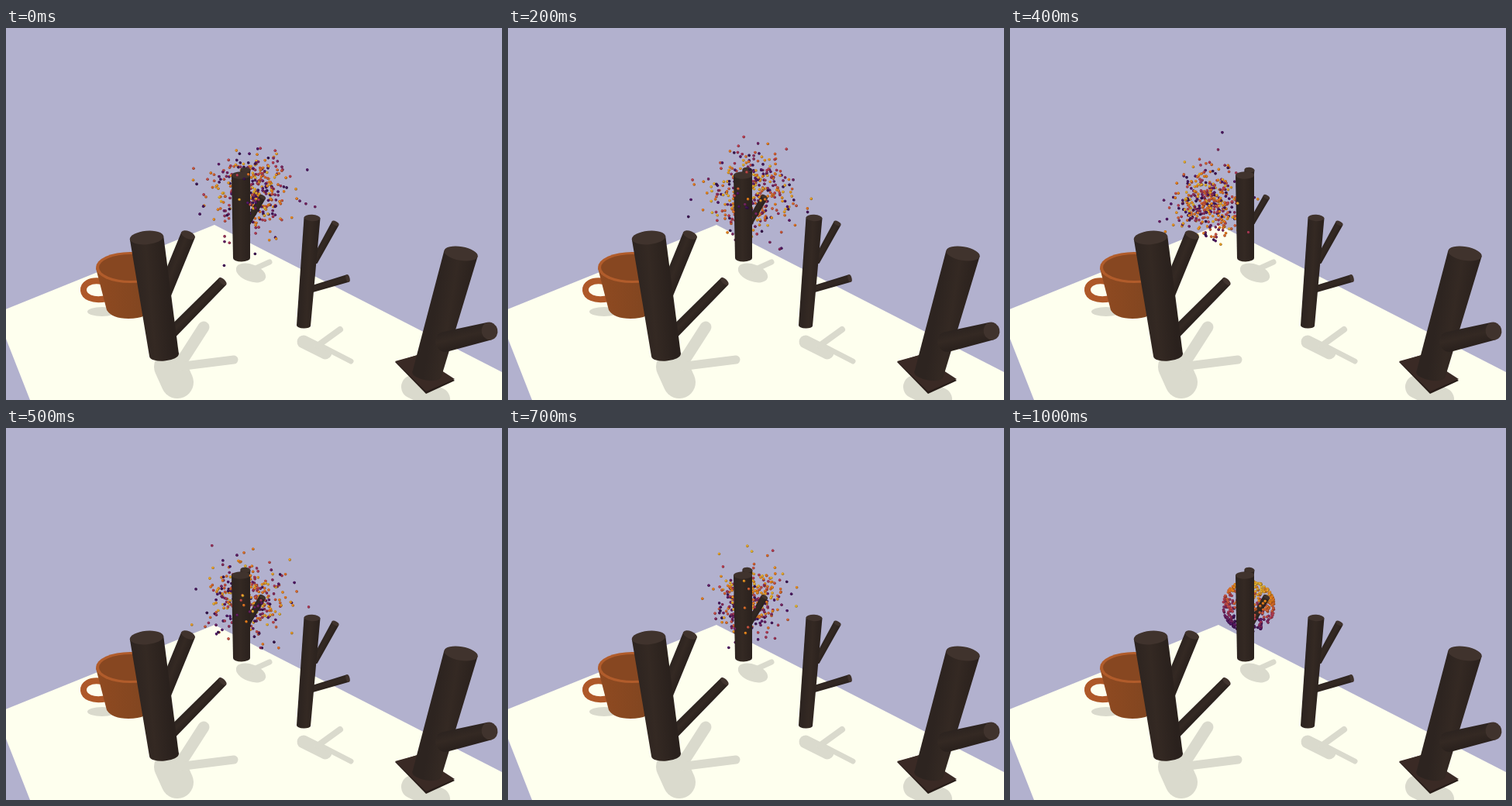
Write an HTML page with a canvas that moves like this. It is 640 by 480 pixels and loops after 2100 ms.

```html
<!DOCTYPE html>
<html lang="en">
<head>
<meta charset="utf-8">
<title>Particles settling into a sphere</title>
<style>
html, body { margin: 0; width: 100%; height: 100%; overflow: hidden; background: #b2b1ce; }
canvas { display: block; }
</style>
</head>
<body>
<canvas id="stage" width="640" height="480"></canvas>
<script>
const ctx = document.getElementById('stage').getContext('2d');
const TAU = Math.PI * 2;
const LOOP = 2100, STEP = 100, LAST_STEP = 10;
const COUNT = 400, RADIUS = 33, SPREAD = 25;
const PALETTE = [[24, 18, 48], [84, 24, 104], [184, 62, 82], [232, 128, 28], [226, 206, 62]];
const SHADOW = '#dadacd';

function random(seed) {
  return () => {
    seed = seed + 0x6d2b79f5 | 0;
    let n = Math.imul(seed ^ seed >>> 15, 1 | seed);
    n = n + Math.imul(n ^ n >>> 7, 61 | n) ^ n;
    return ((n ^ n >>> 14) >>> 0) / 4294967296;
  };
}

function rgb(color, gain = 1) {
  return `rgb(${color.map(c => Math.round(c * gain)).join()})`;
}

function paletteColor(v) {
  const p = Math.max(0, Math.min(3.999, v * 4)), i = Math.floor(p);
  return PALETTE[i].map((c, k) => c + (PALETTE[i + 1][k] - c) * (p - i));
}

// Points on the sphere, coloured by their height in the tilted view.
const nextPoint = random(7);
const points = Array.from({ length: COUNT }, () => {
  const z = nextPoint() * 2 - 1, angle = nextPoint() * TAU, r = Math.sqrt(1 - z * z);
  const x = r * Math.cos(angle), y = r * Math.sin(angle);
  const color = paletteColor(.52 + .4 * (-.88 * y + .25 * x + .4 * z));
  return { x: x * RADIUS, y: y * RADIUS, z: z * RADIUS, light: rgb(color), dark: rgb(color, .68) };
});

// Each step draws fresh noise that fades out while the sphere fades in.
function cloud(step) {
  const t = step / LAST_STEP;
  const weight = t ** 3, spread = SPREAD * (1 - t ** 4);
  const gust = Math.exp(-(((step - 3.5) / .9) ** 4));
  const lift = Math.exp(-4 * (step - 3) ** 2);
  const cx = 317 - 9 * t - 60 * gust;
  const cy = 212 + 18 * t + 8 * gust - 41 * lift;
  const next = random(100 + step * 31);
  const gauss = () => spread * Math.sqrt(-2 * Math.log(1 - next())) * Math.cos(TAU * next());
  return points.map(p => ({
    ...p,
    x: cx + p.x * weight + gauss(),
    y: cy + p.y * weight + gauss(),
    z: p.z * weight + gauss()
  })).sort((a, b) => a.z - b.z);
}
const clouds = Array.from({ length: LAST_STEP + 1 }, (_, step) => cloud(step));

function polygon(color, ...xy) {
  ctx.fillStyle = color;
  ctx.beginPath();
  for (let i = 0; i < xy.length; i += 2) ctx.lineTo(xy[i], xy[i + 1]);
  ctx.fill();
}

function ellipse(color, x, y, rx, ry, angle = 0) {
  ctx.fillStyle = color;
  ctx.beginPath();
  ctx.ellipse(x, y, rx, ry, angle, 0, TAU);
  ctx.fill();
}

function line(color, width, x1, y1, x2, y2) {
  ctx.strokeStyle = color;
  ctx.lineWidth = width;
  ctx.lineCap = 'round';
  ctx.beginPath();
  ctx.moveTo(x1, y1);
  ctx.lineTo(x2, y2);
  ctx.stroke();
}

// Tapered cylinder from its far end (x1, y1) to its base (x2, y2).
function limb(x1, y1, r1, x2, y2, r2, squash = .5, lean = 1) {
  const angle = lean * (Math.atan2(y2 - y1, x2 - x1) - Math.PI / 2);
  const c = Math.cos(angle), s = Math.sin(angle);
  const shade = ctx.createLinearGradient(x1 - c * r1, y1 - s * r1, x1 + c * r1, y1 + s * r1);
  shade.addColorStop(0, '#2d2420');
  shade.addColorStop(.45, '#342923');
  shade.addColorStop(1, '#2a211d');
  ellipse(shade, x2, y2, r2, r2 * squash, angle);
  polygon(shade, x1 - c * r1, y1 - s * r1, x1 + c * r1, y1 + s * r1,
    x2 + c * r2, y2 + s * r2, x2 - c * r2, y2 - s * r2);
  ellipse('#40332d', x1, y1, r1, r1 * squash, angle);
}

// Upright cylinders show caps that tilt less than their axis.
function trunk(x1, y1, r1, x2, y2, r2) {
  limb(x1, y1, r1, x2, y2, r2, .4, .6);
}

function shadows() {
  // back tree
  ellipse(SHADOW, 316, 316, 20, 11, .35);
  line(SHADOW, 7, 318, 312, 340, 302);
  // front tree
  line(SHADOW, 42, 212, 437, 221, 457);
  line(SHADOW, 15, 228, 428, 255, 386);
  line(SHADOW, 11, 222, 437, 294, 428);
  // middle tree
  line(SHADOW, 17, 384, 405, 412, 419);
  line(SHADOW, 8, 402, 410, 431, 389);
  line(SHADOW, 7, 410, 412, 445, 430);
  // right tree
  line(SHADOW, 30, 525, 463, 558, 479);
  // mug
  ellipse(SHADOW, 124, 366, 19, 6);
}

function mug() {
  ctx.strokeStyle = '#ae5828';
  ctx.lineWidth = 8;
  ctx.beginPath();
  ctx.moveTo(124, 327);
  ctx.bezierCurveTo(91, 321, 91, 357, 130, 349);
  ctx.stroke();
  const shade = ctx.createLinearGradient(118, 0, 185, 0);
  shade.addColorStop(0, '#8f4a21');
  shade.addColorStop(1, '#804520');
  ctx.fillStyle = shade;
  ctx.beginPath();
  ctx.moveTo(116, 310);
  ctx.lineTo(130, 364);
  ctx.quadraticCurveTo(137, 375, 158, 375);
  ctx.quadraticCurveTo(184, 375, 188, 360);
  ctx.lineTo(204, 310);
  ctx.fill();
  ellipse('#b15c2b', 160, 309, 44, 20);
  ellipse('#874721', 161, 309, 41, 17);
}

function backdrop() {
  ctx.fillStyle = '#b2b1ce';
  ctx.fillRect(0, 0, 640, 480);
  polygon('#feffee', 269, 254, 640, 444, 640, 480, 31, 480, -13, 368);
  shadows();
  mug();
}

function frontTrees() {
  limb(235, 267, 9.5, 203, 345, 9.5);
  limb(279.5, 327, 6.5, 212, 395, 7.5);
  trunk(181.5, 270.5, 21.8, 204, 422, 19);

  limb(425, 252, 5, 398, 301, 4.5);
  limb(441, 323, 5, 394, 337, 4.5);
  trunk(395, 245, 10.5, 384, 384, 9);

  polygon('#281d19', 502, 431, 531, 422, 579, 455, 542, 472);
  polygon('#3a2a25', 502, 430, 531, 422, 579, 453, 542, 469);
  trunk(587, 291, 22, 543, 447, 19);
  limb(624, 391, 11.5, 566, 405, 13, .9);
}

function dots(list, near, far) {
  for (const p of list) {
    if (p.z < near || p.z >= far) continue;
    ellipse(p.dark, p.x, p.y, 1.8, 1.8);
    ellipse(p.light, p.x - .3, p.y - .4, 1.35, 1.35);
  }
}

function draw(time) {
  const list = clouds[Math.min(LAST_STEP, Math.floor(time % LOOP / STEP))];
  backdrop();
  dots(list, -Infinity, 22);
  limb(309, 183, 6.5, 306, 215, 6);
  limb(331, 218, 4.5, 312, 251, 4);
  dots(list, 22, 36);
  trunk(303, 190, 12, 304, 297, 11);
  dots(list, 36, Infinity);
  frontTrees();
}

const start = performance.now();
function tick() {
  draw(performance.now() - start);
  requestAnimationFrame(tick);
}
tick();
</script>
</body>
</html>
```
